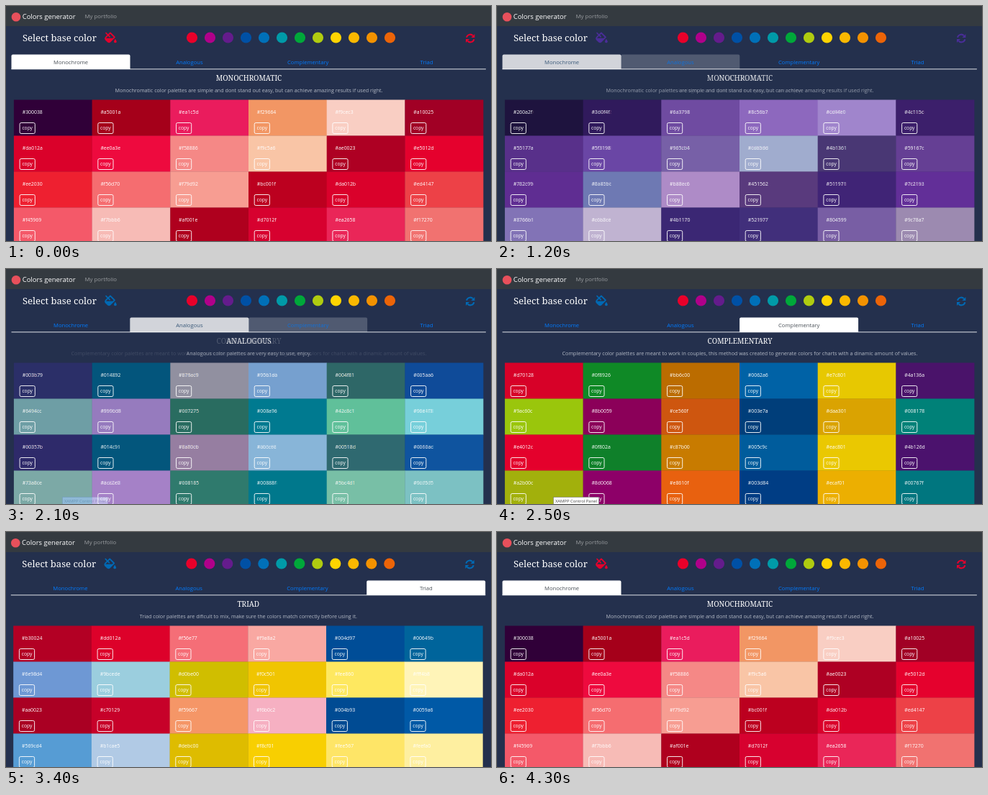
These frames come from a looping animation (674 by 327 pixels, 4500 ms). An HTML page:

```html
<!DOCTYPE html>
<html lang="en">
<head>
<meta charset="utf-8">
<title>Colors generator</title>
<style>
html, body { margin: 0; width: 100%; height: 100%; overflow: hidden; background: #24304d; }
svg { display: block; width: 674px; height: 327px; font-family: "Open Sans", "Noto Sans", sans-serif; }
.serif { font-family: "Noto Serif", "Liberation Serif", serif; fill: #fff; }
.mid { text-anchor: middle; }
</style>
</head>
<body>
<svg id="stage" viewBox="0 0 674 327"></svg>
<script>
const RED = "#e5002c", PURPLE = "#5d1f92", BLUE = "#0069b4";
const TABS = ["Monochrome", "Analogous", "Complementary", "Triad"];
const DOTS = "e8002a b0008a 641c8c 0050a5 0070b8 009aa8 00a83a b0cc10 ffd400 fab800 f39200 ec6408".split(" ");
const MONO = "Monochromatic color palettes are simple and dont stand out easy, but can achieve amazing results if used right.";

const scenes = [
  { tab: 0, icon: RED, title: "MONOCHROMATIC", note: MONO,
    colors: "300038 a5001a ea1c5d f29664 f9cec3 a10025 da012a ee0a3e f58886 f9c5a6 ae0023 e5012d ee2030 f56d70 f79d92 bc001f da012b ed4147 f45969 f7bbb6 af001e d7012f ea2658 f17270" },
  { tab: 0, icon: PURPLE, title: "MONOCHROMATIC", note: MONO,
    colors: "260a2f 3d0f4f 6a3798 8c56b7 ca94e0 4c115c 55177a 5f3198 965cb4 cab5dd 4b1361 59167c 782c99 8a85bc b88ec6 451562 511971 7c2193 8766b1 c6b8ce 4b1170 521977 804599 9c78a7" },
  { tab: 1, icon: BLUE, title: "ANALOGOUS", note: "Analogous color palettes are very easy to use, enjoy.",
    colors: "003b79 014892 879ac9 95b1da 004f81 005aa6 6494cc 999bd8 007275 008a96 42c8c1 96e4f3 00357b 014c91 8a80cb abcce8 00518d 0066ac 73a8ce aca2e0 008185 00888f 5bc4d1 9cd5d5" },
  { tab: 2, icon: BLUE, title: "COMPLEMENTARY", tip: "XAMPP Control Panel",
    note: "Complementary color palettes are meant to work in couples, this method was created to generate colors for charts with a dinamic amount of values.",
    colors: "d70128 0f8926 bb6c00 0062a6 e7c801 4a136a 9ac60c 8b0059 ce560f 003e7a daa301 008178 e4012c 0f802a c87b00 005c9c eac801 4b126d a2b00c 8d0068 e8610f 003d84 ecaf01 00767f" },
  { tab: 3, icon: BLUE, title: "TRIAD", shift: -0.7, note: "Triad color palettes are dificult to mix, make sure the colors match correctly before using it.",
    colors: "b30024 dd012a f56e77 f9a8a2 004d97 00649b 6e98d4 9bcede d0be00 f0c501 fee860 fff4b8 aa0023 c70129 f59667 f6b0c2 004b93 0059a6 569cd4 b1cae5 debc00 f8cf01 fee567 feefa0" }
];

const rect = (x, y, w, h, fill, extra = "") =>
  `<rect x="${x}" y="${y}" width="${w}" height="${h}" fill="${fill}" ${extra}/>`;
const text = (x, y, size, fill, str, cls = "") =>
  `<text x="${x}" y="${y}" font-size="${size}" fill="${fill}" class="${cls}">${str}</text>`;

const bucket = color => `<g transform="translate(137 36.5) scale(.029)" fill="${color}">
  <path fill-rule="evenodd" d="M70 0L168 91L250 9Q272-10 295 9L503 217Q522 240 503 262L281 484Q213 540 145 484L28 367Q-25 300 28 231L123 136L32 38ZM66 288H386L435 240L272 77L213 136L272 195Q285 235 245 250L227 240L168 181L73 276Z"/>
  <path d="M512 320Q448 412 448 448A64 64 0 0 0 576 448Q576 412 512 320Z"/></g>`;

const refresh = color => {
  const half = `<path d="M-5.2-1.2A5.3 5.3 0 0 1 3.7-3.8" fill="none" stroke="${color}" stroke-width="2"/>
    <path d="M6.2-6V-1H1.2Z" fill="${color}"/>`;
  return `<g transform="translate(645.2 45)">${half}<g transform="rotate(180)">${half}</g></g>`;
};

function tab(name, i, active) {
  const x = 7.5 + i * 164.8, on = i === active;
  const back = on ? `<path d="M${x} 88V69.5q0-2 2-2h161q2 0 2 2V88z" fill="#fff"/>` : "";
  return back + text(x + 82.6, 81, 7.65, on ? "#495057" : "#007bff", name, "mid");
}

function cell(hex, i) {
  const x = 10.9 + i % 6 * 108.7, y = 130.5 + Math.floor(i / 6) * 50;
  return rect(x, y, 109, 50.3, "#" + hex) +
    text(x + 11.8, y + 19.1, 6.9, "#fff", "#" + hex) +
    rect(x + 8.2, y + 32, 21.2, 15, "none", 'rx="2" stroke="#fff" stroke-width=".9"') +
    text(x + 18.8, y + 41.5, 6.7, "#fff", "copy", "mid");
}

function draw(s) {
  const dots = DOTS.map((c, i) => `<circle cx="${258.5 + i * 25}" cy="44" r="7.6" fill="#${c}"/>`).join("");
  const tip = s.tip ? rect(78.5, 317.5, 63, 11, "#fff", 'stroke="#777" stroke-width=".6"') +
    text(110, 324.6, 5.9, "#444", s.tip, "mid") : "";
  return `<g class="scene">${rect(0, 0, 674, 327, "#24304d")}<g transform="translate(${s.shift || 0})">` +
    rect(-2, 0, 680, 28, "#343a40") +
    '<circle cx="14" cy="15.2" r="6.3" fill="#e8505b"/>' +
    text(22.7, 18.3, 9.45, "#fff", "Colors generator") +
    text(109.5, 17.4, 7.8, "#9a9da0", "My portfolio") +
    text(23, 49, 13.05, "#fff", "Select base color", "serif") +
    bucket(s.icon) + dots + refresh(s.icon) +
    rect(7.5, 87.3, 659.4, 1, "#dee2e6") +
    TABS.map((name, i) => tab(name, i, s.tab)).join("") +
    text(337.5, 104.3, 10, "#fff", s.title, "serif mid") +
    text(337.5, 119.7, 7.17, "#b4bac6", s.note, "mid") +
    s.colors.split(" ").map(cell).join("") + tip + "</g></g>";
}

// The first scene is stacked again on top to close the loop.
const stage = document.getElementById("stage");
stage.innerHTML = [...scenes, scenes[0]].map(draw).join("") +
  '<path id="shade" d="M0 62L372 0H674V268L365 327H0Z"/>';
const layers = [...stage.querySelectorAll(".scene")];
const shade = document.getElementById("shade");

const LOOP = 4500, STEP = 100;
const fades = [[200, 6], [1200, 5], [2100, 5], [3000, 5], [3900, 5]];
const progress = (t, [start, steps]) =>
  Math.max(0, Math.min(steps, Math.floor((t - start) / STEP) + 1)) / steps;

const origin = performance.now();
function frame() {
  const t = (performance.now() - origin) % LOOP;
  fades.forEach((f, i) => layers[i + 1].setAttribute("opacity", progress(t, f)));
  shade.setAttribute("opacity", 0.25 * Math.sin(Math.PI * progress(t, fades[0])));
  requestAnimationFrame(frame);
}
frame();
</script>
</body>
</html>
```
